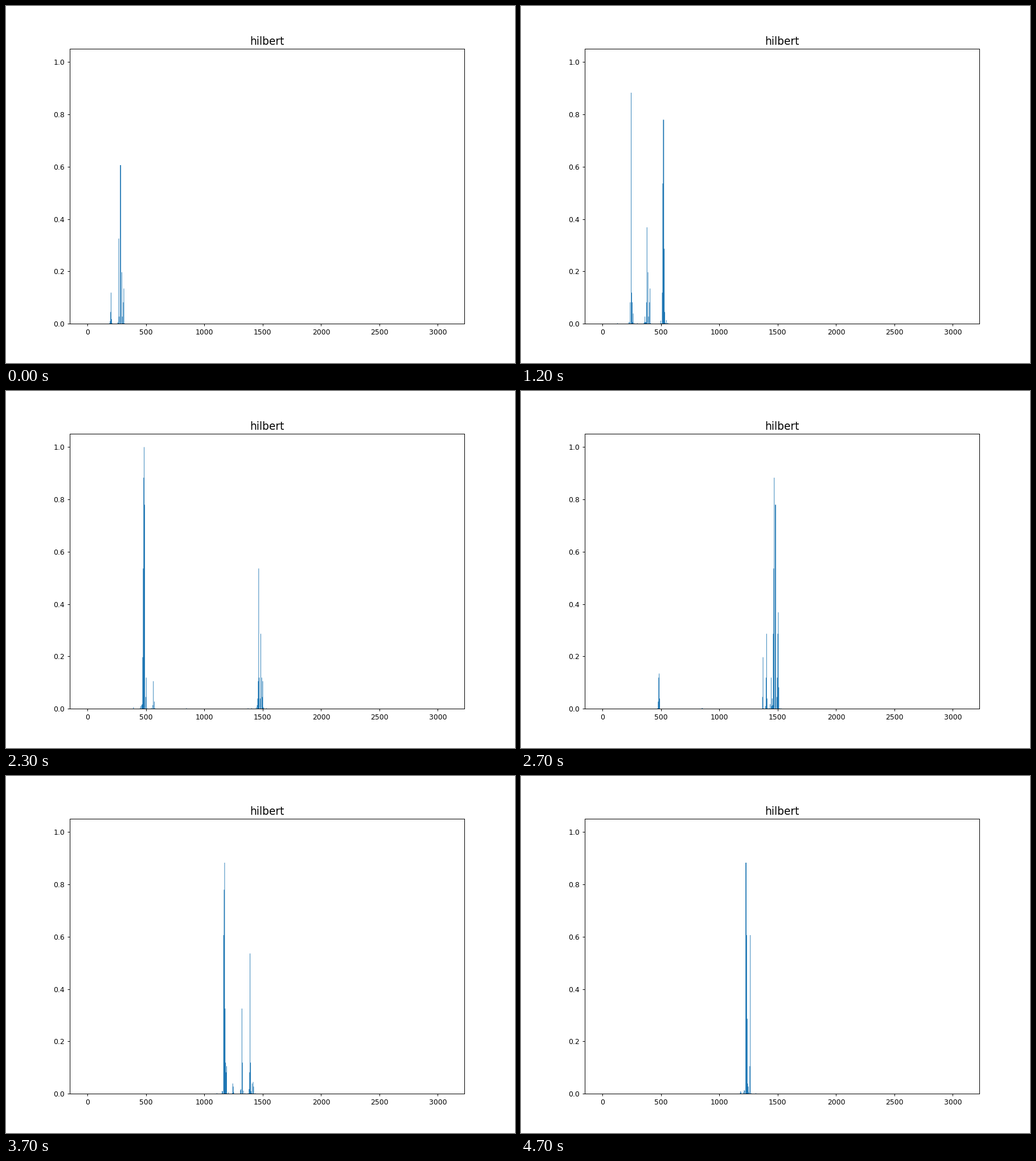
These frames come from a looping animation (894x626 px, 4.8 s). A matplotlib script:

```python
import numpy as np
import matplotlib.pyplot as plt
from matplotlib.animation import FuncAnimation

WIDTH, HEIGHT, DPI = 894, 626, 89.4
COLS, ROWS = 64, 48
SIGMA = 2
CENTER_X = 22

# Bars are snapped to a fine 1000 x 700 raster before scaling to the stage.
LEFT, AXES_W, AXES_H = 125, 775, 539


def sign(v):
    return (v > 0) - (v < 0)


def curve(x, y, ax, ay, bx, by):
    """Yield cells of a generalized Hilbert curve; a is the major axis."""
    w, h = abs(ax + ay), abs(bx + by)
    dax, day, dbx, dby = map(sign, (ax, ay, bx, by))
    if h == 1:
        for k in range(w):
            yield x + k * dax, y + k * day
        return
    if w == 1:
        for k in range(h):
            yield x + k * dbx, y + k * dby
        return

    ax2, ay2, bx2, by2 = ax // 2, ay // 2, bx // 2, by // 2
    if 2 * w > 3 * h:
        if abs(ax2 + ay2) % 2 and w > 2:
            ax2, ay2 = ax2 + dax, ay2 + day
        yield from curve(x, y, ax2, ay2, bx, by)
        yield from curve(x + ax2, y + ay2, ax - ax2, ay - ay2, bx, by)
    else:
        if abs(bx2 + by2) % 2 and h > 2:
            bx2, by2 = bx2 + dbx, by2 + dby
        yield from curve(x, y, bx2, by2, ax2, ay2)
        yield from curve(x + bx2, y + by2, ax, ay, bx - bx2, by - by2)
        yield from curve(x + ax - dax + bx2 - dbx, y + ay - day + by2 - dby,
                         -bx2, -by2, ax2 - ax, ay2 - ay)


cells = np.array(list(curve(0, 0, COLS, 0, 0, ROWS)))
index = np.arange(len(cells))

# Axis limits of a bar chart with width 0.8 and 5 % margins
span = len(cells) - 0.2
x_min, x_max = -0.4 - 0.05 * span, span - 0.4 + 0.05 * span


def snap(v):
    return np.floor(v + 0.5).astype(int)


def column(x):
    return snap(LEFT + (x - x_min) / (x_max - x_min) * AXES_W) - LEFT


# Only bars that straddle a column boundary survive the snapping.
start = column(index - 0.4)
shown = column(index + 0.4) > start


def heights(row):
    d2 = (cells[:, 0] - CENTER_X) ** 2 + (cells[:, 1] - row) ** 2
    bars = np.exp(-d2 / (2 * SIGMA ** 2))
    out = np.zeros(AXES_W)
    out[start[shown]] = snap(bars[shown] / 1.05 * AXES_H) / AXES_H
    return out


fig, ax = plt.subplots(figsize=((WIDTH + 0.001) / DPI, (HEIGHT + 0.001) / DPI),
                       dpi=DPI)
fig.subplots_adjust(left=0.125, right=0.9, bottom=0.11, top=0.88)
plt.rcParams["font.family"] = "DejaVu Sans"
ax.set_title("hilbert", fontsize=15)

steps = ax.stairs(heights(0), np.linspace(0, 1, AXES_W + 1), fill=True,
                  color="#1f77b4", lw=0, transform=ax.transAxes, zorder=1)
steps.set_snap(False)
ax.set_xlim(x_min, x_max)
ax.set_ylim(0, 1.05)


def update(row):
    steps.set_data(values=heights(row))
    return steps,


anim = FuncAnimation(fig, update, frames=ROWS, interval=100, repeat=True,
                     repeat_delay=0)
plt.show()
```
